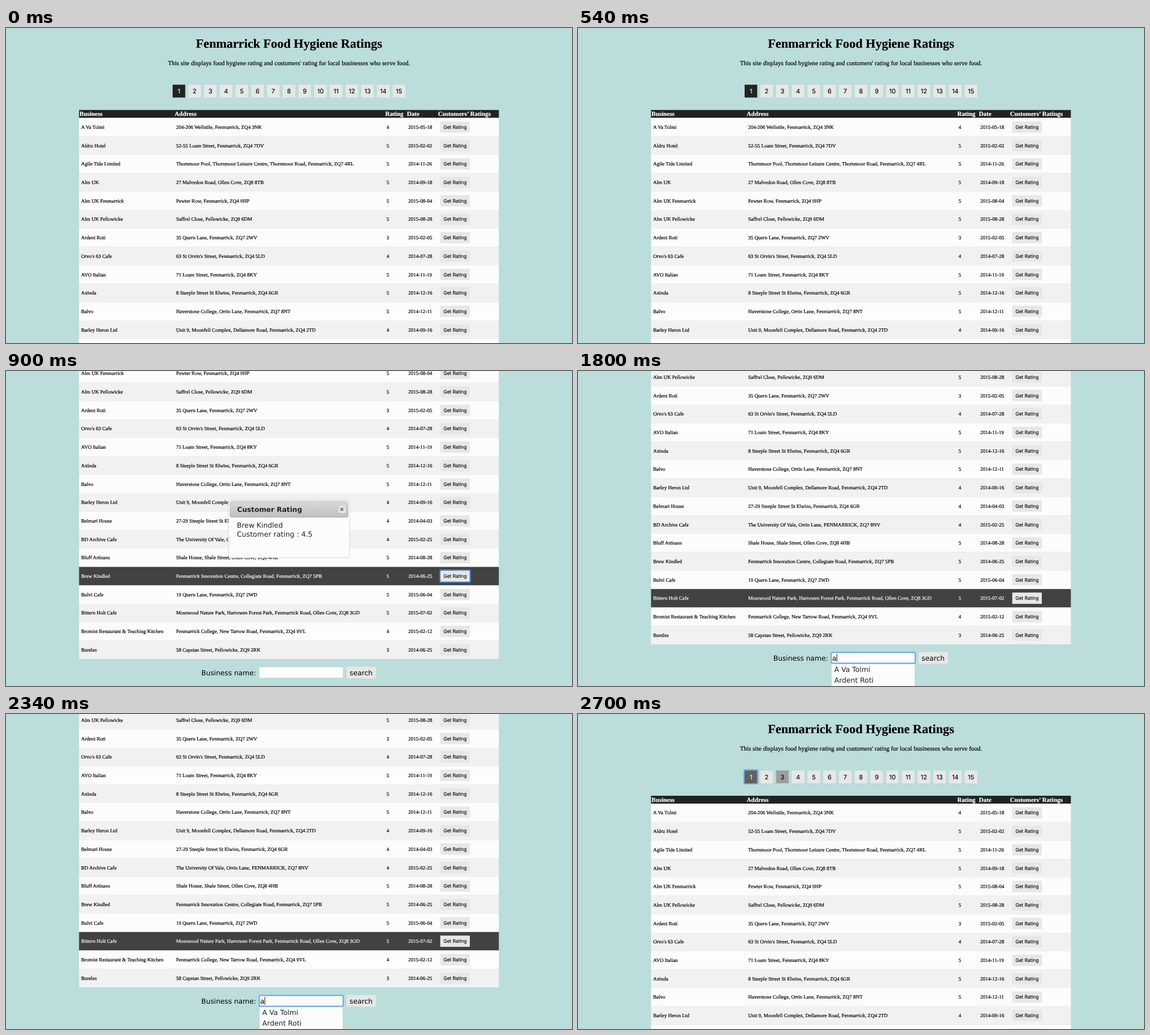
Write an HTML page that moves like this. It is 1002 by 559 pixels and loops after 3600 ms.

```html
<!DOCTYPE html>
<html lang="en">
<head>
<meta charset="utf-8">
<title>Food hygiene ratings</title>
<style>
html, body { margin: 0; width: 100%; height: 100%; overflow: hidden; background: #bbdddb; }
svg { display: block; width: 1002px; height: 559px; }
text { fill: currentColor; text-rendering: geometricPrecision; }
.serif { font-family: "Liberation Serif", "Times New Roman", serif; stroke: currentColor; stroke-width: .2px; }
.ui { font-family: Inter, Arial, sans-serif; stroke: currentColor; stroke-width: .12px; }
.sans { font-family: "DejaVu Sans", Verdana, sans-serif; }
.bold { font-weight: bold; }
.mid { text-anchor: middle; }
</style>
</head>
<body>
<svg id="stage" viewBox="0 0 1002 559">
  <defs>
    <linearGradient id="bar" x1="0" y1="0" x2="0" y2="1">
      <stop offset="0" stop-color="#dadada"/>
      <stop offset="1" stop-color="#bebebe"/>
    </linearGradient>
  </defs>
</svg>
<script>
const ROW_H = 32.7, TABLE_X = 129.3, TABLE_W = 743.2, TABLE_Y = 159.5;
const RING = '#76aae6';

// name | address | rating | date
const rows = `A Va Tolmi|204-206 Wellstile, Fenmarrick, ZQ4 3NK|4|2015-05-18
Aldru Hotel|52-55 Loam Street, Fenmarrick, ZQ4 7DV|5|2015-02-02
Agile Tide Limited|Thornmoor Pool, Thornmoor Leisure Centre, Thornmoor Road, Fenmarrick, ZQ7 4RL|5|2014-11-26
Alm UK|27 Malvedon Road, Ollen Cove, ZQ8 8TB|5|2014-09-18
Alm UK Fenmarrick|Pewter Row, Fenmarrick, ZQ4 9HP|5|2015-08-04
Alm UK Pellowicke|Saffrel Close, Pellowicke, ZQ9 6DM|5|2015-08-28
Ardent Roti|35 Quern Lane, Fenmarrick, ZQ7 2WV|3|2015-02-05
Orvo's 63 Cafe|63 St Orvin's Street, Fenmarrick, ZQ4 5LD|4|2014-07-28
AVO Italian|71 Loam Street, Fenmarrick, ZQ4 8KY|5|2014-11-19
Axinda|8 Steeple Street St Elwins, Fenmarrick, ZQ4 6GR|5|2014-12-16
Balvo|Haverstone College, Orrin Lane, Fenmarrick, ZQ7 8NT|5|2014-12-11
Barley Heron Ltd|Unit 9, Moonfell Complex, Dellamore Road, Fenmarrick, ZQ4 2TD|4|2014-09-16
Belmari House|27-29 Steeple Street St Elwins, Fenmarrick, ZQ4 6GR|4|2014-04-03
BD Archive Cafe|The University Of Vale, Orrin Lane, FENMARRICK, ZQ7 8NV|4|2015-02-25
Bluff Artisans|Shale House, Shale Street, Ollen Cove, ZQ8 4HB|5|2014-08-28
Brew Kindled|Fenmarrick Innovation Centre, Collegiate Road, Fenmarrick, ZQ7 5PB|5|2014-06-25
Bulvi Cafe|19 Quern Lane, Fenmarrick, ZQ7 2WD|5|2015-06-04
Bittern Holt Cafe|Mosswood Nature Park, Harrowen Forest Park, Fenmarrick Road, Ollen Cove, ZQ8 3GD|5|2015-07-02
Bromist Restaurant & Teaching Kitchen|Fenmarrick College, New Tarrow Road, Fenmarrick, ZQ4 9VL|4|2015-02-12
Buntles|58 Capstan Street, Pellowicke, ZQ9 2RK|3|2014-06-25`
  .split('\n').map(line => line.split('|'));

function add(parent, tag, attrs, content) {
  const node = document.createElementNS('http://www.w3.org/2000/svg', tag);
  for (const key in attrs) node.setAttribute(key, attrs[key]);
  if (content !== undefined) node.textContent = content;
  return parent.appendChild(node);
}
const group = parent => add(parent, 'g', {});
const rect = (parent, x, y, width, height, fill, more) =>
  add(parent, 'rect', { x, y, width, height, fill, ...more });
const text = (parent, x, y, size, cls, content, color = '#000') =>
  add(parent, 'text', { x, y, 'font-size': size, class: cls, color }, content);
const outline = (parent, x, y, w, h, stroke) =>
  rect(parent, x, y, w, h, 'none', { stroke, 'stroke-width': 2.2, rx: 2 });
const show = (node, on) => node.setAttribute('display', on ? 'inline' : 'none');

const stage = document.getElementById('stage');
rect(stage, 0, 0, 1002, 559, '#bbdddb');
const page = group(stage);

text(page, 501, 34.7, 22.27, 'serif bold mid', 'Fenmarrick Food Hygiene Ratings');
text(page, 501, 65.5, 11.13, 'serif mid',
  "This site displays food hygiene rating and costumers' rating for local businesses who serve food.");

const tabs = [];
for (let i = 0; i < 15; i++) {
  const x = 295 + i * 27.83;
  tabs.push(rect(page, x, 100.6, 22.3, 22.8, '#e7e7e7'));
  text(page, x + 11.15, 116.2, 11, 'ui mid', i + 1, i ? '#000' : '#fff');
}
const tabRing = outline(page, 293.9, 99.6, 24.5, 24.8, RING);

// Table
rect(page, TABLE_X, 145.5, TABLE_W, 14, '#222');
[[130, 'Business'], [298.5, 'Address'], [671.5, 'Rating'], [709.7, 'Date'], [764.8, 'Customers’ Ratings']]
  .forEach(([x, label]) => text(page, x, 156.2, 11.13, 'serif bold', label, '#fff'));

const table = rows.map((cells, i) => {
  const y = TABLE_Y + i * ROW_H;
  const back = rect(page, TABLE_X, y, TABLE_W, ROW_H, '#fcfcfc');
  const words = [133, 301.2, 673.8, 712.2]
    .map((x, c) => text(page, x, y + 19.4, 9.07, 'serif', cells[c]));
  rect(page, 768.8, y + 6.3, 52.3, 20, '#e7e7e7');
  text(page, 795, y + 19.4, 8.4, 'ui mid', 'Get Rating');
  return { back, words };
});
const buttonRing = outline(page, 768, TABLE_Y + 15 * ROW_H + 5.4, 54, 21.8, '#4376ba');

// Search form
text(page, 345.8, 842, 12.25, 'sans', 'Business name:');
rect(page, 448.5, 827.8, 148.3, 19.2, '#fcfcfc', { stroke: '#d9dede', 'stroke-width': .7 });
rect(page, 602.6, 827.2, 52.3, 20.8, '#e7e7e7');
text(page, 628.7, 842, 12.25, 'sans mid', 'search');

const typing = group(page);
rect(typing, 448.4, 848.3, 148.1, 60, '#fcfcfc', { stroke: '#c4cccc', 'stroke-width': .7 });
text(typing, 453.8, 862.5, 12.4, 'sans', rows[0][0], '#222');
text(typing, 453.8, 881.8, 12.4, 'sans', rows[6][0], '#222');
outline(typing, 448.4, 827.8, 148.6, 19.4, RING);
text(typing, 450, 842, 12.25, 'sans', 'a');
rect(typing, 457.8, 830.6, .9, 14, '#000');

// Rating dialog
const dialog = group(stage);
rect(dialog, 394, 228.8, 214.3, 102.4, '#fcfcfc', { stroke: '#cfcfcf', 'stroke-width': .8, rx: 3 });
rect(dialog, 396.8, 231.3, 208.7, 28.4, 'url(#bar)', { stroke: '#aaa', 'stroke-width': .8, rx: 3 });
text(dialog, 409.3, 250, 12.15, 'sans bold', 'Customer Rating', '#222');
rect(dialog, 588.3, 239.3, 12.6, 12.6, '#e8e8e8', { stroke: '#cfcfcf', 'stroke-width': .7, rx: 2 });
add(dialog, 'path', { d: 'M592 243l5 5m0-5l-5 5', stroke: '#777', 'stroke-width': 2 });
text(dialog, 408.8, 278, 12.4, 'sans', rows[15][0], '#222');
text(dialog, 408.8, 293.5, 12.5, 'sans', 'Customer rating : 4.5', '#222');

const scenes = [
  { scroll: 0, hover: -1 },
  { scroll: 302.3, hover: 15, dialog: true },
  { scroll: 328.5, hover: 17, typing: true },
  { scroll: .4, hover: -1, paging: true }
];
let current;

function draw(time) {
  const scene = scenes[Math.floor(time % 3600 / 900)];
  if (scene === current) return;
  current = scene;
  page.setAttribute('transform', `translate(0 ${-scene.scroll})`);
  table.forEach(({ back, words }, i) => {
    const hot = i === scene.hover;
    back.setAttribute('fill', hot ? '#424242' : i % 2 ? '#f1f1f1' : '#fcfcfc');
    words.forEach(word => word.setAttribute('color', hot ? '#fff' : '#000'));
  });
  tabs[0].setAttribute('fill', scene.paging ? '#616161' : '#222');
  tabs[2].setAttribute('fill', scene.paging ? '#9e9e9e' : '#e7e7e7');
  show(tabRing, scene.paging);
  show(buttonRing, scene.dialog);
  show(dialog, scene.dialog);
  show(typing, scene.typing);
}

const start = performance.now();
function tick() {
  draw(performance.now() - start);
  requestAnimationFrame(tick);
}
tick();
</script>
</body>
</html>
```
